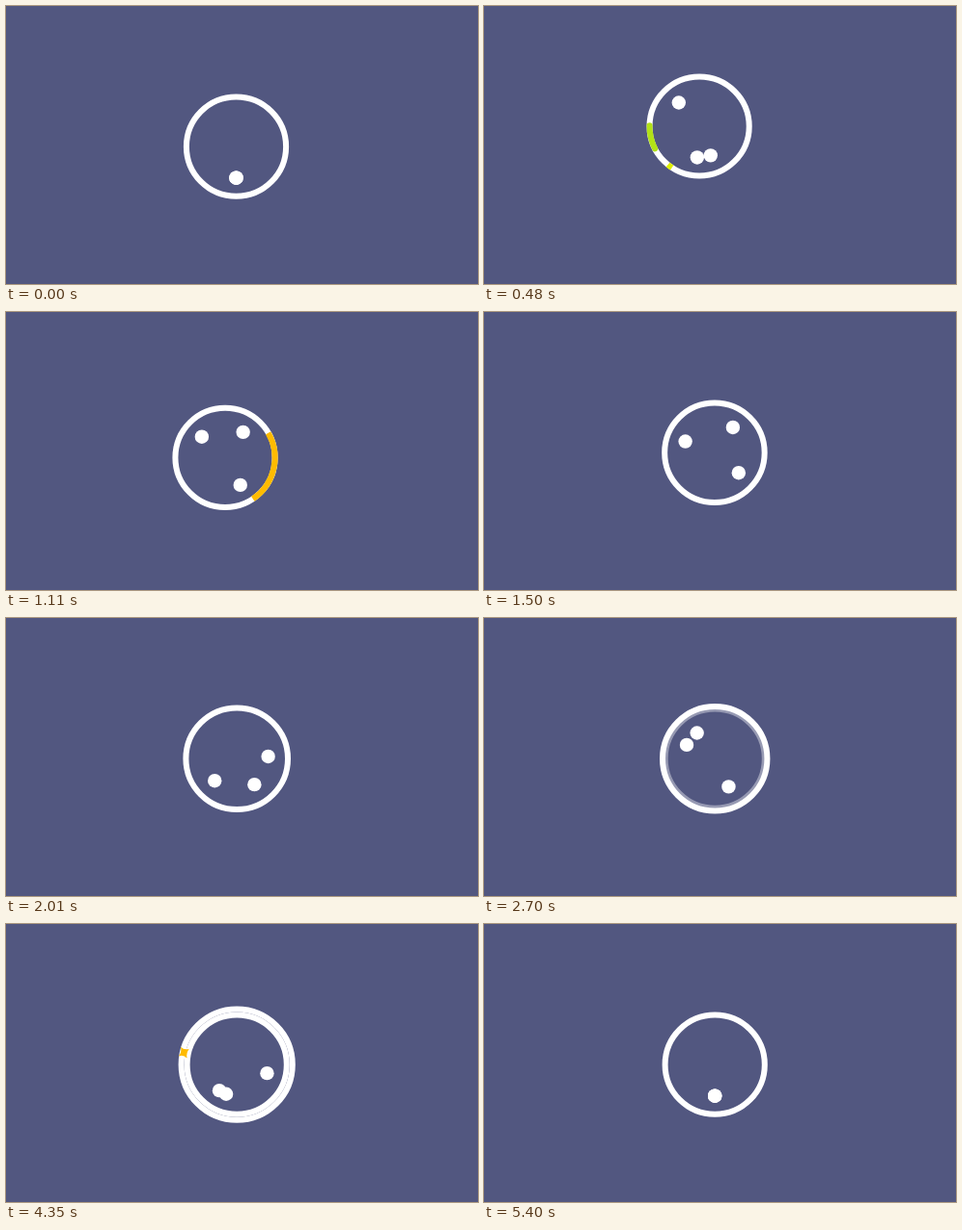
An HTML page that plays this animation: 489 px wide and 289 px high, repeating every 5.7 s.

```html
<!DOCTYPE html>
<html>
<head>
<meta charset="utf-8">
<style>
html, body { margin: 0; width: 100%; height: 100%; overflow: hidden; background: #525780; }
svg { display: block; width: 489px; height: 289px; }
</style>
</head>
<body>
<svg viewBox="0 0 489 289">
  <rect width="489" height="289" fill="#525780"/>
  <g id="stage" fill="none" stroke-width="6">
    <circle id="inner" r="51.6" stroke="#fff"/>
    <circle id="outer" stroke="#fff" pathLength="360"/>
    <path id="spark" fill="#ffbb00" d="M-4.5-5Q0-2 4.5-5Q2 0 4.5 5Q0 2-4.5 5Q-2 0-4.5-5"/>
  </g>
</svg>
<script>
const LOOP = 5700, END = 5400, STEP = 30;
const RING = 51.6, ORBIT = 32.5, GROW = 1420, OPEN = 4400;
const NS = 'http://www.w3.org/2000/svg';
const [stage, inner, outer, spark] =
  ['stage', 'inner', 'outer', 'spark'].map(id => document.getElementById(id));

const rad = deg => deg * Math.PI / 180;
const wave = deg => Math.sin(rad(deg));
const mix = (a, b, p) => a + (b - a) * p;
const span = (t, a, b) => Math.min(1, Math.max(0, (t - a) / (b - a)));
const smooth = p => p * p * (3 - 2 * p);
const bump = p => Math.sin(Math.PI * p);
const show = (el, on) => { el.style.display = on ? '' : 'none'; };

function circle(attrs) {
  const el = document.createElementNS(NS, 'circle');
  for (const k in attrs) el.setAttribute(k, attrs[k]);
  return stage.appendChild(el);
}

// coloured arcs that swell, run along the ring and shrink again
const sweeps = [
  { color: '#b2e117', from: 300, to: 660, mid: 167, travel: 120, half: 14, cap: 'round' },
  { color: '#dff000', from: 450, to: 900, mid: 213, travel: 200, half: 14, cap: 'butt' },
  { color: '#ffbb00', from: 900, to: 1320, mid: 13, travel: 130, half: 43, cap: 'butt' }
];
for (const s of sweeps)
  s.el = circle({ r: RING, pathLength: 360, stroke: s.color, 'stroke-linecap': s.cap });

// each dot always turns clockwise through a few angles, measured from the bottom
const times = [0, 480, 1110, 2010, 3390, 4350, END];
const dots = [
  [139, 331, 266, 34, 286],
  [4, 132, 326, 256, 34],
  [339, 215, 45, 237, 20]
].map(list => {
  let sum = 0;
  const angles = [0, ...list, 0].map(a => sum += (a - sum % 360 + 360) % 360);
  angles[angles.length - 1] = Math.ceil(angles[5] / 360) * 360;
  return { angles, el: circle({ r: 7.2, fill: '#fff' }) };
});

// smooth curve through the angles, at rest at both ends
function turn(a, t) {
  const last = times.length - 1;
  if (t >= END) return a[last];
  const i = times.findIndex((_, j) => t < times[j + 1]);
  const slope = j => j % last ? (a[j + 1] - a[j - 1]) / (times[j + 1] - times[j - 1]) : 0;
  const d = times[i + 1] - times[i], p = (t - times[i]) / d;
  return mix(a[i], a[i + 1], smooth(p)) +
    d * p * (1 - p) * ((1 - p) * slope(i) - p * slope(i + 1));
}

function arc(el, start, end) {
  el.setAttribute('stroke-dasharray', end - start + ' 400');
  el.setAttribute('transform', `rotate(${start})`);
}

function moveRing(t) {
  const power = smooth(span(t, 0, 300)) * (1 - smooth(span(t, 600, 1600)));
  const x = 24 * wave(1.208 * t);
  const y = -6.5 - 30.5 * wave(1.815 * t);
  const drift = .7 * span(t, 1200, 2000);
  stage.setAttribute('transform', `translate(${238.5 + drift + x * power} ${146.2 + y * power})`);
}

// the outer ring widens, a new inner one fades in, then the outer one unwinds
function drawRings(t) {
  inner.setAttribute('stroke-opacity', t < GROW ? 1 : span(t, 2010, 3735));
  outer.setAttribute('r', RING + 6.1 * span(t, GROW, OPEN));
  const open = span(t, OPEN, 5370);
  show(outer, t >= GROW && open < 1);
  if (open > 0) arc(outer, mix(193, 310, open ** 2), mix(310, 553, (1 - open) ** 1.34));
  else outer.removeAttribute('stroke-dasharray');

  const glow = bump(span(t, 4290, 4410));
  show(spark, glow > .01);
  spark.setAttribute('transform', `rotate(193) translate(56.3) scale(${glow})`);
}

function drawSweep(s, t) {
  const p = span(t, s.from, s.to);
  const mid = s.mid + (p - .5) * s.travel, half = s.half * bump(p);
  show(s.el, p > 0 && p < 1);
  arc(s.el, mid - half, mid + half);
}

function drawDot(dot, t) {
  const a = rad(turn(dot.angles, t));
  dot.el.setAttribute('cx', -ORBIT * Math.sin(a));
  dot.el.setAttribute('cy', ORBIT * Math.cos(a));
}

function draw(t) {
  moveRing(t);
  drawRings(t);
  sweeps.forEach(s => drawSweep(s, t));
  dots.forEach(d => drawDot(d, t));
}

const began = performance.now();
function tick() {
  const t = (performance.now() - began) % LOOP;
  draw(Math.min(END, Math.floor(t / STEP) * STEP));
  requestAnimationFrame(tick);
}
tick();
</script>
</body>
</html>
```
